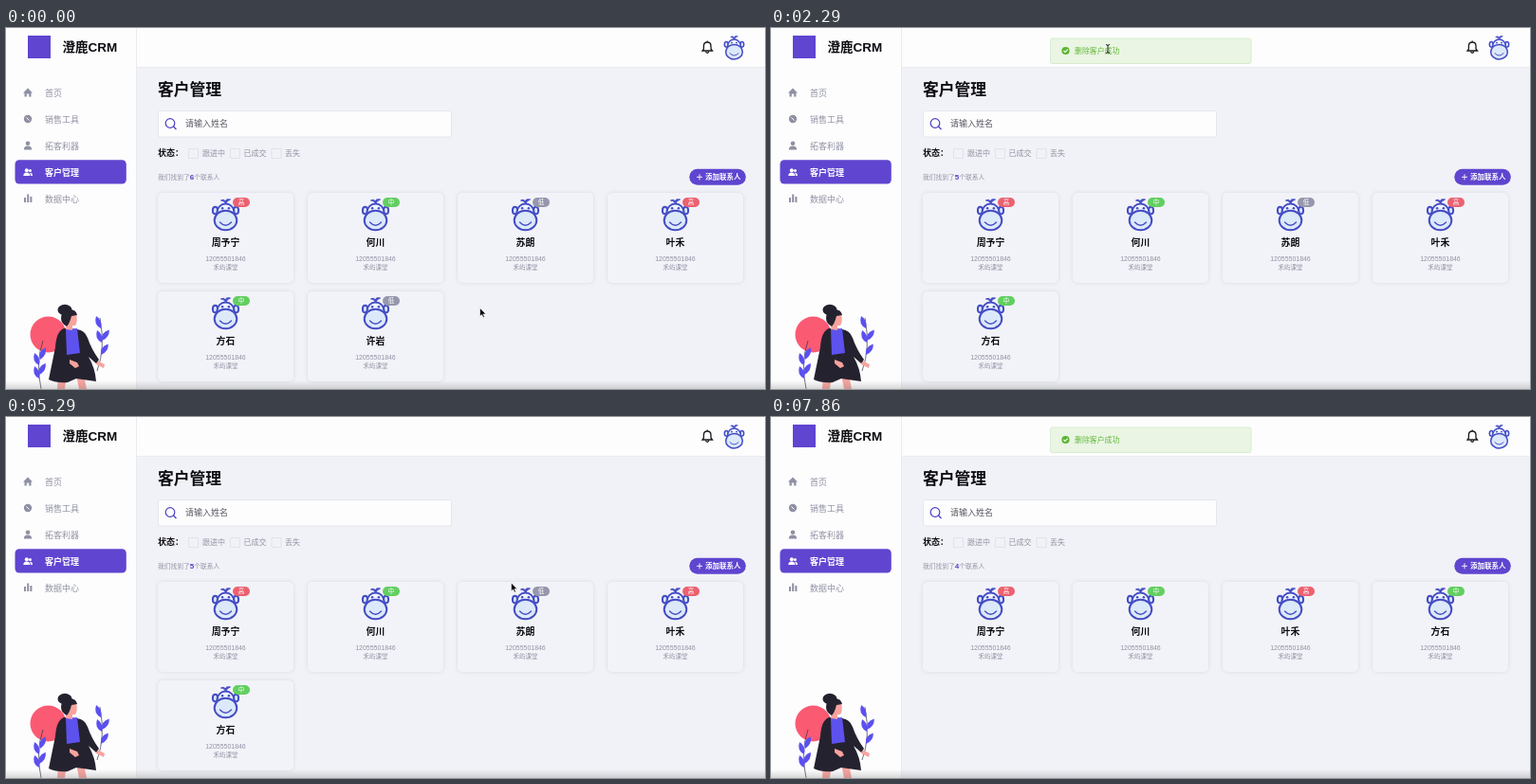
Animation of 800x381 px, one loop 8.01 s. Source, as an HTML page:

```html
<!DOCTYPE html>
<html lang="zh-CN">
<head>
<meta charset="utf-8">
<style>
html, body { margin: 0; width: 100%; height: 100%; overflow: hidden; background: #f1f2f7 }
svg { display: block; font-family: "Liberation Sans", "Noto Sans CJK SC", "Noto Sans CJK", sans-serif }
</style>
</head>
<body>
<svg id="stage" width="800" height="381" viewBox="0 0 800 381">
  <defs>
    <linearGradient id="shade" x2="0" y2="1">
      <stop offset="0" stop-color="#888" stop-opacity="0"/>
      <stop offset="1" stop-color="#777" stop-opacity=".3"/>
    </linearGradient>
    <g id="monkey" fill="#dce9fa" stroke="#444cc4" stroke-width="2" stroke-linecap="round">
      <path d="M0-11q-1-4-5-4 3-2 5 1 0-3 5-2-4 1-5 5" fill="#444cc4" stroke-width="1"/>
      <ellipse cx="-11" cy="-4.500" rx="2.600" ry="3.800"/><ellipse cx="11" cy="-4.500" rx="2.600" ry="3.800"/>
      <circle cy="-2.500" r="9" fill="#eef4fd"/>
      <ellipse cy="6" rx="11.800" ry="10.300"/>
      <path d="M-6 8q6 6.500 12 0" fill="none" stroke-width="1.300"/>
      <g fill="#444cc4" stroke="none">
        <circle cx="-3.400" cy="-6.800" r="1.300"/><circle cx="3.400" cy="-6.800" r="1.300"/>
      </g>
    </g>
    <path id="leaf" d="M0 0q-8-4-5-13q7 4 5 13"/>
  </defs>
  <path fill="#fdfdfe" d="M0 0H800V41.500H137V381H0z"/>
  <path d="M137.500 0V381M138 41.500H800" stroke="#eaebf1"/>

  <rect x="23" y="8" width="24" height="24" fill="#5f45d0"/>
  <rect x="9.500" y="139.300" width="117.300" height="25.300" rx="4.500" fill="#6045d0"/>
  <g fill="#8f90a3">
    <path d="M18 68.500l5-5 5 5h-1.500v4h-2.300v-3h-2.400v3h-2.300v-4z"/>
    <circle cx="23" cy="96" r="4.200"/>
    <circle cx="23" cy="121.700" r="2.300"/><path d="M18.800 128.500q0-4 4.200-4t4.200 4z"/>
    <path d="M19 179h2v5h-2zM22.200 175.500h2v8.500h-2zM25.400 178h2v6h-2z"/>
  </g>
  <path d="M21.500 94.500l3 3" stroke="#fdfdfe"/>
  <g fill="#fff">
    <circle cx="21.800" cy="150.300" r="2"/><path d="M18.300 156q0-3.500 3.500-3.500t3.500 3.500z"/>
    <circle cx="25.500" cy="150.500" r="1.500"/><path d="M25 152.700q3 0 3 3.300h-2q0-2-1-3.300"/>
  </g>

  <circle cx="44.500" cy="323.500" r="19" fill="#fb5a73"/>
  <path d="M37 381q-6-28 2-51M96 362q9-24 3-56" stroke="#34314a" stroke-width=".7" fill="none"/>
  <g fill="#5b50f0">
    <use href="#leaf" x="35" y="356"/><use href="#leaf" x="35" y="370"/>
    <use href="#leaf" transform="translate(35 366)rotate(50)"/><use href="#leaf" transform="translate(36 350)rotate(45)"/>
    <use href="#leaf" x="100" y="317"/><use href="#leaf" x="101" y="332"/>
    <use href="#leaf" transform="translate(101 330)rotate(55)"/><use href="#leaf" transform="translate(100 345)rotate(55)"/>
  </g>
  <path d="M55 366h9l-2 15h-8zM74 366h8l3 15h-8zM96 351l8 4-1 4-8-4z" fill="#f8a39d"/>
  <path d="M61 317q-8 3-9 20l-7 34q9 4 20 3l9-4 21 3q-1-14-8-26l8 7 3-4q-8-11-12-23-3-8-11-9z" fill="#25222f"/>
  <path d="M63 318l12-1 3 26-14 2z" fill="#5d52ee"/>
  <path d="M65 302l9-1q2 9-1 13h-3v5l-7-1zM67 350l8 3 2 4-4 2-6-5z" fill="#f8a39d"/>
  <g fill="#25222f"><ellipse cx="62" cy="297.500" rx="7.500" ry="5.800"/>
    <path d="M58 306q0-9 9-9 7 0 8 6l-6 1q-2 8-5 11-6-3-6-9z"/></g>

  <path d="M734 24h10.500l-1.500-2v-3q0-4-3.800-4t-3.800 4v3zM737.500 25q1.700 2.500 3.400 0M739.200 13.500v1.500"
    fill="none" stroke="#17171c" stroke-width="1.300"/>
  <use href="#monkey" transform="translate(767.500 20.700)scale(.75)"/>

  <rect x="160.500" y="87.500" width="309" height="27.500" rx="2" fill="#fdfdfe" stroke="#e5e6ed"/>
  <g fill="none" stroke="#4b3fc4" stroke-width="1.200"><circle cx="173" cy="100.500" r="4.800"/><path d="M176.500 104l3 3"/></g>
  <path d="M192.500 127.500h10v10h-10zM236.500 127.500h10v10h-10zM280 127.500h10v10h-10z" fill="none" stroke="#e1e2ea"/>
  <rect x="720.300" y="148.800" width="59.500" height="17" rx="8.500" fill="#5f45cf"/>
  <path d="M728 157.300h6M731 154.300v6" stroke="#fff" stroke-width=".9"/>

  <g id="labels"></g>
  <g id="live"></g>
  <rect y="372" width="800" height="9" fill="url(#shade)"/>
</svg>
<script>
const LOOP = 8010, STEP = 1000 / 7;
const FIRST = 1475, SECOND = 6486, HIDE = 4500;
const GREY = '#9192a4', DARK = '#0d0d12';
const LEVELS = { 高: '#ec6170', 中: '#62cf61', 低: '#9697ac' };
const people = [['周予宁', '高'], ['何川', '中'], ['苏朗', '低'], ['叶禾', '高'], ['方石', '中'], ['许岩', '低']];
// time, x, y of the pointer
const path = [
  [0, 499.5, 295.5], [280, 499.5, 295.5], [900, 451.5, 287.5], [1575, 451.5, 287.5],
  [2150, 355, 22], [2400, 355, 22], [2750, 320, 24], [2900, 320, 24], [3500, 364, 26.5],
  [4350, 364, 26.5], [5286, 532.5, 175], [5750, 609, 183], [6560, 609, 183],
  [6714, 624, 193.5], [6860, 626, 230], [7300, 626, 395], [LOOP, 626, 395]
];
const $ = id => document.getElementById(id);
const clamp = v => Math.max(0, Math.min(1, v));
const smooth = v => v * v * (3 - 2 * v);

// x is the left edge (or the middle with MID), y the middle of the line
const text = (x, y, str, size, fill, attrs = '') =>
  `<text x="${x}" y="${y + size * .38}" font-size="${size}" fill="${fill}" ${attrs}>${str}</text>`;
const BOLD = 'font-weight="700" ', MID = 'text-anchor="middle" ';

$('labels').innerHTML =
  text(59.5, 20, '澄鹿CRM', 13.5, DARK, BOLD) +
  ['首页', '销售工具', '拓客利器', '客户管理', '数据中心'].map((s, i) =>
    text(41, 68.2 + 28 * i, s, 9, i == 3 ? '#fff' : GREY, i == 3 ? BOLD : '')).join('') +
  text(160, 65, '客户管理', 16.8, DARK, BOLD) +
  text(189, 101, '请输入姓名', 9, '#55565f') +
  text(160, 132, '状态：', 9, DARK, BOLD) +
  [[207, '跟进中'], [250.5, '已成交'], [294, '丢失']].map(([x, s]) => text(x, 132, s, 8, GREY)).join('') +
  text(737, 157.3, '添加联系人', 7.5, '#fff', BOLD);

function pointer(t) {
  const i = path.findIndex(p => p[0] > t);
  const [t0, x0, y0] = path[i - 1], [t1, x1, y1] = path[i];
  const k = smooth((t - t0) / (t1 - t0));
  return [x0 + (x1 - x0) * k, y0 + (y1 - y0) * k];
}

// share of the last 300 ms the pointer spent well inside the card
function hover(t, x, y) {
  let n = 0;
  for (let i = 0; i < 10; i++) {
    const [px, py] = pointer(Math.max(0, t - i * 30));
    if (px > x + 2 && px < x + 141 && py > y + 2 && py < y + 93) n++;
  }
  return n / 10;
}

function card([name, level], i, t) {
  const x = 160 + 158 * (i % 4), y = 174 + 104 * (i >> 2), mid = x + 71.5;
  const h = hover(t, x, y);
  const glow = h ? `rgba(96,69,230,${h * .55})` : 'rgba(60,60,90,.13)';
  return `<rect x="${x}" y="${y}" width="143" height="95" rx="5" fill="#f2f3f8"
      stroke="rgba(110,90,235,${h * .5})" style="filter:drop-shadow(0 0 2px ${glow})"/>
    <use href="#monkey" x="${mid}" y="${y + 23}"/>
    <rect x="${x + 79}" y="${y + 5}" width="18" height="10" rx="5" fill="${LEVELS[level]}"/>` +
    text(x + 88, y + 10, level, 6.5, '#fff', MID) +
    text(mid, y + 52.7, name, 9.9, DARK, BOLD + MID) +
    text(mid, y + 69.5, '12055501846', 6.95, GREY, MID) +
    text(mid, y + 79, '禾屿课堂', 6.5, GREY, MID);
}

function toast(t) {
  const first = t < SECOND;
  let shown = smooth(clamp((t - (first ? FIRST : SECOND)) / 400));
  if (first) shown *= 1 - smooth(clamp((t - HIDE) / 400));
  if (!shown) return '';
  const picked = first && t > 2850 ? Math.max(0, Math.min(40, pointer(Math.min(t, 4300))[0] - 320)) : 0;
  return `<g transform="translate(0 ${-27 * (1 - shown)})" opacity="${clamp(shown * 6)}">
    <rect x="294.5" y="11" width="211.5" height="26.5" rx="2" fill="#eaf5e3" stroke="#d8ecce"/>
    <circle cx="310.5" cy="24" r="4.1" fill="#5cb531"/>
    <path d="M308.5 24l1.5 1.5 2.7-2.9" fill="none" stroke="#fff" stroke-width="1.1"/>
    <rect x="320" y="18.5" width="${picked}" height="11.5" fill="#9dc2ee"/>` +
    text(320, 24, '删除客户成功', 7.9, '#62b83a') + '</g>';
}

function cursor(t) {
  const [x, y] = pointer(t);
  const beam = t > 2100 && t < HIDE && y < 38;
  const pressed = (t > 1400 && t < 1500) || (t > 2850 && t < 4200) || (t > 6400 && t < 6500);
  const ring = pressed ? '<circle r="9.3" fill="#fff" fill-opacity=".3" stroke="#111" stroke-width="1.2"/>' : '';
  const shape = beam
    ? '<path d="M-2-4.5q2 0 2 1.5 0-1.500 2-1.500M0-3V3M-2 4.500q2 0 2-1.500 0 1.500 2 1.500" fill="none" stroke="#111" stroke-width=".9"/>'
    : '<path d="M0 0v8.800l2-1.900 1.500 3.200 1.400-.6-1.400-3.100h2.800z" fill="#000" stroke="#fff" stroke-width=".6"/>';
  return `<g transform="translate(${x} ${y})">${ring}${shape}</g>`;
}

function draw(t) {
  const list = people.filter((_, i) => !(i == 5 && t > FIRST) && !(i == 2 && t > SECOND));
  const count = `我们找到了<tspan font-size="8" font-weight="700" fill="#5540c8">${list.length}</tspan>个联系人`;
  $('live').innerHTML = text(160, 157.5, count, 6.75, GREY) +
    list.map((p, i) => card(p, i, t)).join('') + toast(t) + cursor(t);
}

let last = -1;
function tick() {
  const n = Math.min(55, Math.floor((performance.now() % LOOP + 6) / STEP));
  if (n != last) draw((last = n) * STEP);
  requestAnimationFrame(tick);
}
tick();
</script>
</body>
</html>
```
